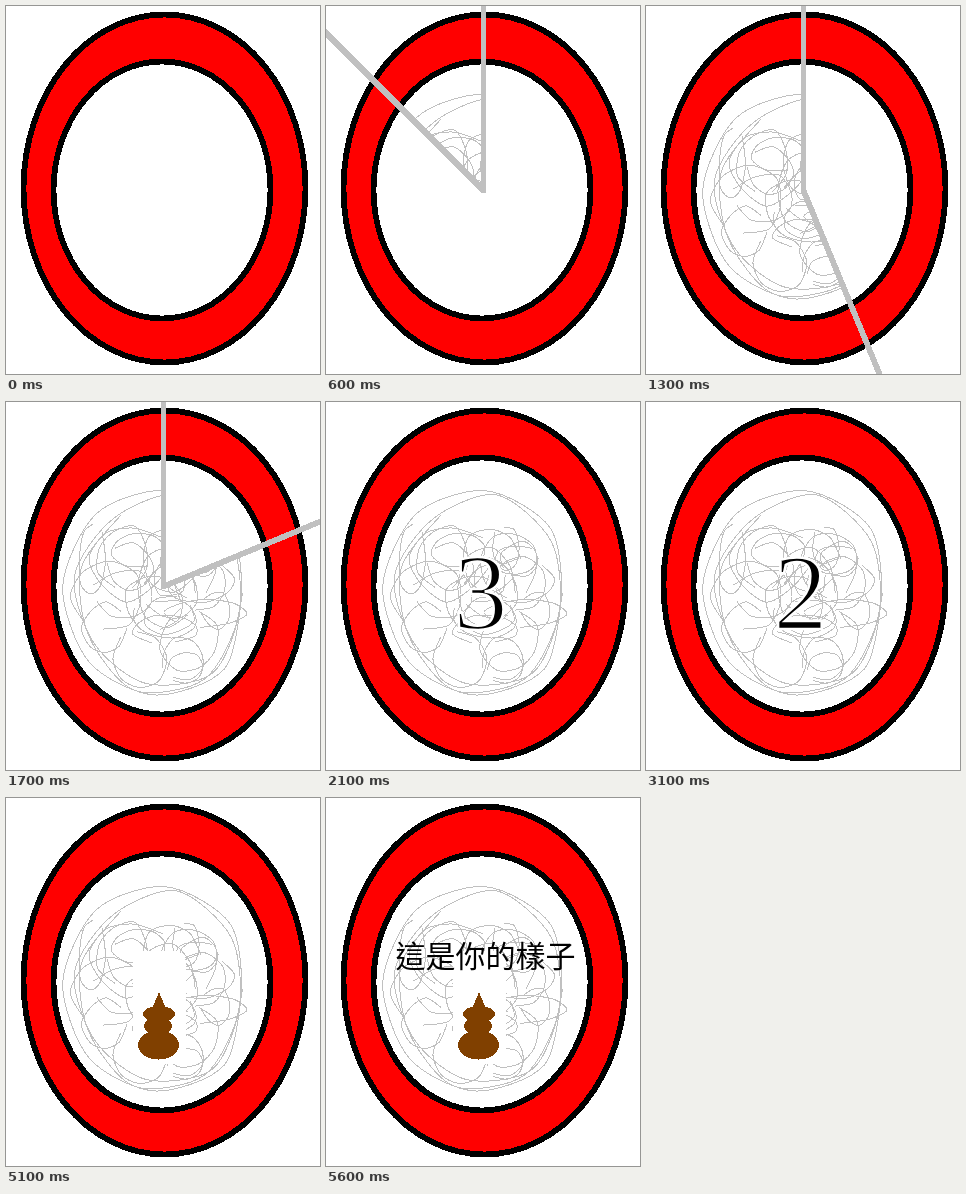
Write an HTML page that moves like this. It is 314 px wide and 368 px high and loops after 8 s.

```html
<!DOCTYPE html>
<html lang="zh-Hant">
<head>
<meta charset="utf-8">
<style>
html, body { margin: 0; width: 100%; height: 100%; overflow: hidden; background: #fff; }
svg { display: block; width: 100vw; height: 100vh; }
.pen { stroke-width: 5.8; }
.ring { stroke: #000; }
.line { fill: none; stroke: #c0c0c0; }
#count { font: 109px "Liberation Serif", serif; text-anchor: middle; stroke: #fff; stroke-width: 2.6; }
#caption { font: 300 30px "Noto Sans CJK TC", "Noto Sans CJK", sans-serif; }
</style>
</head>
<body>
<svg viewBox="0 0 314 368" shape-rendering="crispEdges">
  <clipPath id="sector"><polygon id="wedge"/></clipPath>
  <ellipse class="pen ring" cx="158.5" cy="182.5" rx="141" ry="174" fill="#f00"/>
  <ellipse class="pen ring" cx="156" cy="184" rx="108.5" ry="128.5" fill="#fff"/>
  <path id="scribble" class="line" clip-path="url(#sector)"/>
  <path id="hands" class="pen line" stroke-linejoin="round"/>
  <text id="count" y="226.5"></text>
  <g id="pile" fill="#804000">
    <rect x="127" y="153" width="53" height="113" rx="12" fill="#fff"/>
    <path d="M153 194L161 213H145Z"/>
    <ellipse cx="153" cy="216" rx="16" ry="8"/>
    <ellipse cx="152" cy="228" rx="14" ry="9"/>
    <ellipse cx="152.5" cy="247" rx="20.5" ry="14.5"/>
  </g>
  <text id="caption" x="69.5" y="169">這是你的樣子</text>
</svg>
<script>
const LOOP = 8000, SWEEP = 500, COUNT = 2100, PILE = 5100, CAPTION = 5600;
const STEPS = 16, CX = 157.5, CY = 184.5;
const area = { x: 152, y: 191, rx: 94, ry: 104 };
const $ = id => document.getElementById(id);

let seed = 41;
const rnd = (a, b) => {
  seed = (seed * 16807) % 2147483647;
  return a + (b - a) * seed / 2147483647;
};

// Smooth curve through the points
function curve(p) {
  const at = i => p[Math.max(0, Math.min(p.length - 1, i))];
  let d = 'M' + p[0];
  for (let i = 0; i < p.length - 1; i++) {
    const [a, b, c, e] = [at(i - 1), at(i), at(i + 1), at(i + 2)];
    const c1 = b.map((v, k) => v + (c[k] - a[k]) / 7);
    const c2 = c.map((v, k) => v - (e[k] - b[k]) / 7);
    d += `C${c1} ${c2} ${c}`;
  }
  return d;
}

// Wobbly round stroke of n points
function scrawl(x, y, rx, ry, n) {
  const from = rnd(0, 2 * Math.PI);
  return curve(Array.from({ length: n }, (_, i) => {
    const a = from + i * 0.8, k = rnd(0.82, 1.02);
    return [x + rx * k * Math.cos(a), y + ry * k * Math.sin(a)];
  }));
}

// Small loop placed anywhere that keeps it inside the area
function loop() {
  const a = rnd(0, 2 * Math.PI), far = Math.sqrt(rnd(0.02, 1));
  const rx = rnd(14, 42), ry = rnd(14, 42);
  return scrawl(area.x + (area.rx - rx) * far * Math.cos(a),
    area.y + (area.ry - ry) * far * Math.sin(a), rx, ry, 8);
}

$('scribble').setAttribute('d',
  scrawl(area.x, area.y, area.rx, area.ry, 22) +
  Array.from({ length: 28 }, loop).join(''));

// Point far out along the hand, counted anticlockwise from the top
function ray(step) {
  const a = step * 2 * Math.PI / STEPS;
  return `${CX - 420 * Math.sin(a)},${CY - 420 * Math.cos(a)}`;
}

const show = (id, on) => { $(id).style.display = on ? '' : 'none'; };

function draw(t) {
  const step = t < SWEEP ? 0 : Math.min(STEPS, Math.floor((t - SWEEP) / 100) + 1);
  const edge = Array.from({ length: step + 1 }, (_, i) => ray(i));
  $('wedge').setAttribute('points', `${CX},${CY} ${edge.join(' ')}`);
  $('hands').setAttribute('d', `M${ray(0)}L${CX},${CY}L${ray(step)}`);

  const n = 3 - Math.max(0, Math.min(2, Math.floor((t - COUNT) / 1000)));
  $('count').textContent = n;
  $('count').setAttribute('x', n > 1 ? 154.5 : 147.5);

  show('scribble', step > 0);
  show('hands', step > 0 && t < COUNT);
  show('count', t >= COUNT && t < PILE);
  show('pile', t >= PILE);
  show('caption', t >= CAPTION);
}

const start = performance.now();
function tick() {
  draw((performance.now() - start) % LOOP);
  requestAnimationFrame(tick);
}
tick();
</script>
</body>
</html>
```
